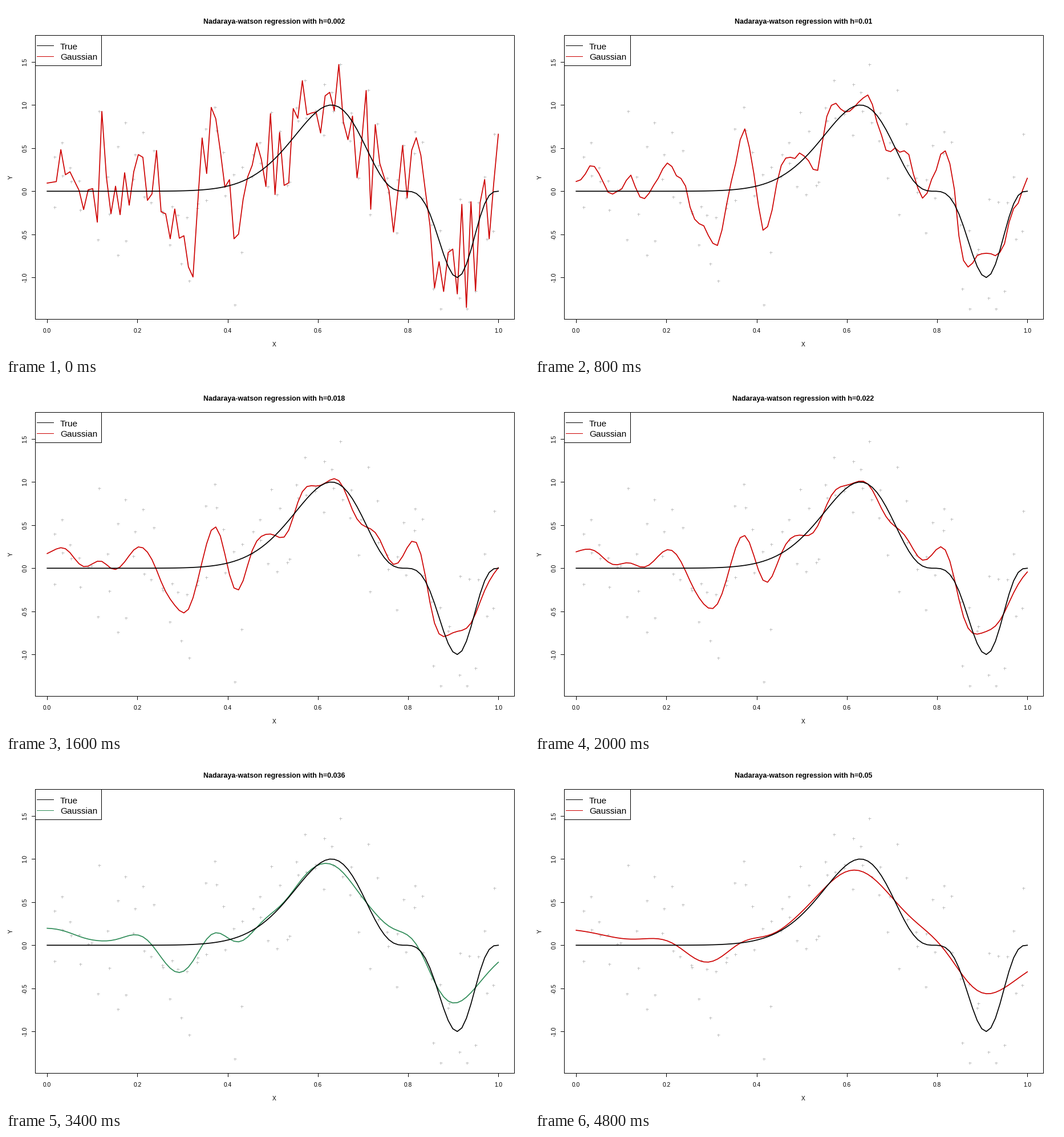
Animation of 917x611 px, one loop 5 s. Source, as a matplotlib script:

```python
import numpy as np
import matplotlib.pyplot as plt
from matplotlib.animation import FuncAnimation

W, H, DPI = 917, 611, 64
PT = 72 / DPI  # points per pixel
LEFT, RIGHT, TOP, BOTTOM = 50, 890, 50, 547
RED, GREEN, GREY = "#cd0000", "#2e8b57", "#bebebe"
BEST_H = 0.036

plt.rcParams["font.family"] = "Liberation Sans"
fig = plt.figure(figsize=(W / DPI, H / DPI), dpi=DPI, facecolor="white")
ax = fig.add_axes([0, 0, 1, 1])
ax.set_xlim(-0.5, W - 0.5)
ax.set_ylim(H - 0.5, -0.5)
ax.axis("off")


def to_px(x):
    return 71.7 + 791 * x


def to_py(y):
    return 323.8 - 151 * y


def stroke(xs, ys, color="black", width=1):
    return ax.plot(xs, ys, color=color, lw=width * PT,
                   solid_joinstyle="miter" if width == 1 else "round")[0]


def label(x, y, text, size, **kw):
    return ax.text(x, y, text, size=size * PT, va="baseline",
                   rotation_mode="anchor", **kw)


def box(x0, y0, x1, y1):
    stroke([x0, x1, x1, x0, x0], [y0, y0, y1, y1, y0])


def observations(pairs=50):
    """Scatter around a wavy path; each pair's noise cancels out."""
    path_x, path_y = np.transpose([
        (0, -.15), (.035, .4), (.08, -.15), (.11, .22), (.15, -.2),
        (.185, .27), (.225, .33), (.255, -.24), (.312, -.72), (.374, .9),
        (.414, -.6), (.46, .42), (.5, .5), (.535, .03), (.56, 1.15),
        (.6, .88), (.655, 1.15), (.69, .35), (.735, .55), (.77, -.3),
        (.81, .65), (.84, .1), (.862, -1.25), (.9, -.5), (.94, -.95),
        (.98, 0), (1, .2)])
    rng = np.random.default_rng(5)
    x = np.repeat(np.linspace(0.014, 0.992, pairs), 2)
    x += rng.uniform(-0.004, 0.004, x.size)
    noise = np.repeat(rng.normal(0, 0.4, pairs), 2) * np.tile([1, -1], pairs)
    return x, np.clip(np.interp(x, path_x, path_y) + noise, -1.36, 1.69)


obs_x, obs_y = observations()
grid = np.linspace(0, 1, 100)


def smooth(h):
    """Nadaraya-Watson estimate with a Gaussian kernel of deviation h."""
    weight = np.exp(-((grid[:, None] - obs_x) / h) ** 2 / 2)
    return weight @ obs_y / weight.sum(axis=1)


ax.plot(to_px(obs_x), to_py(obs_y), "+", color=GREY, ms=5 * PT, mew=PT)
estimate = stroke(to_px(grid), to_py(smooth(0.002)), RED, 1.7)
stroke(to_px(grid), to_py(np.sin(2 * np.pi * grid ** 3) ** 3), width=1.7)

box(LEFT, TOP, RIGHT, BOTTOM)
for v in np.arange(6) / 5:
    stroke([to_px(v)] * 2, [BOTTOM, BOTTOM + 6])
    label(to_px(v), 571, f"{v:.1f}", 10.3, ha="center")
for v in np.arange(-2, 4) / 2:
    stroke([LEFT - 6, LEFT], [to_py(v)] * 2)
    label(36, to_py(v), f"{v:.1f}", 10.3, ha="center", rotation=90)
label(470, 596, "X", 10.3, ha="center")
label(11, 299, "Y", 10.3, ha="center", rotation=90)
title = label(470, 31, "", 12.35, ha="center", weight="bold")

box(LEFT, TOP, 166, 103)
stroke([53, 82], [68, 68])
key = stroke([53, 82], [87, 87], RED)
label(94.5, 75, "True", 15.4)
label(94.5, 94, "Gaussian", 15.4)


def update(i):
    h = round(0.002 * (i + 1), 3)
    color = GREEN if h == BEST_H else RED
    estimate.set_ydata(to_py(smooth(h)))
    estimate.set_color(color)
    key.set_color(color)
    title.set_text(f"Nadaraya-watson regression with h={h:g}")
    return estimate, key, title


anim = FuncAnimation(fig, update, frames=25, interval=200, repeat=True,
                     repeat_delay=0)
plt.show()
```
